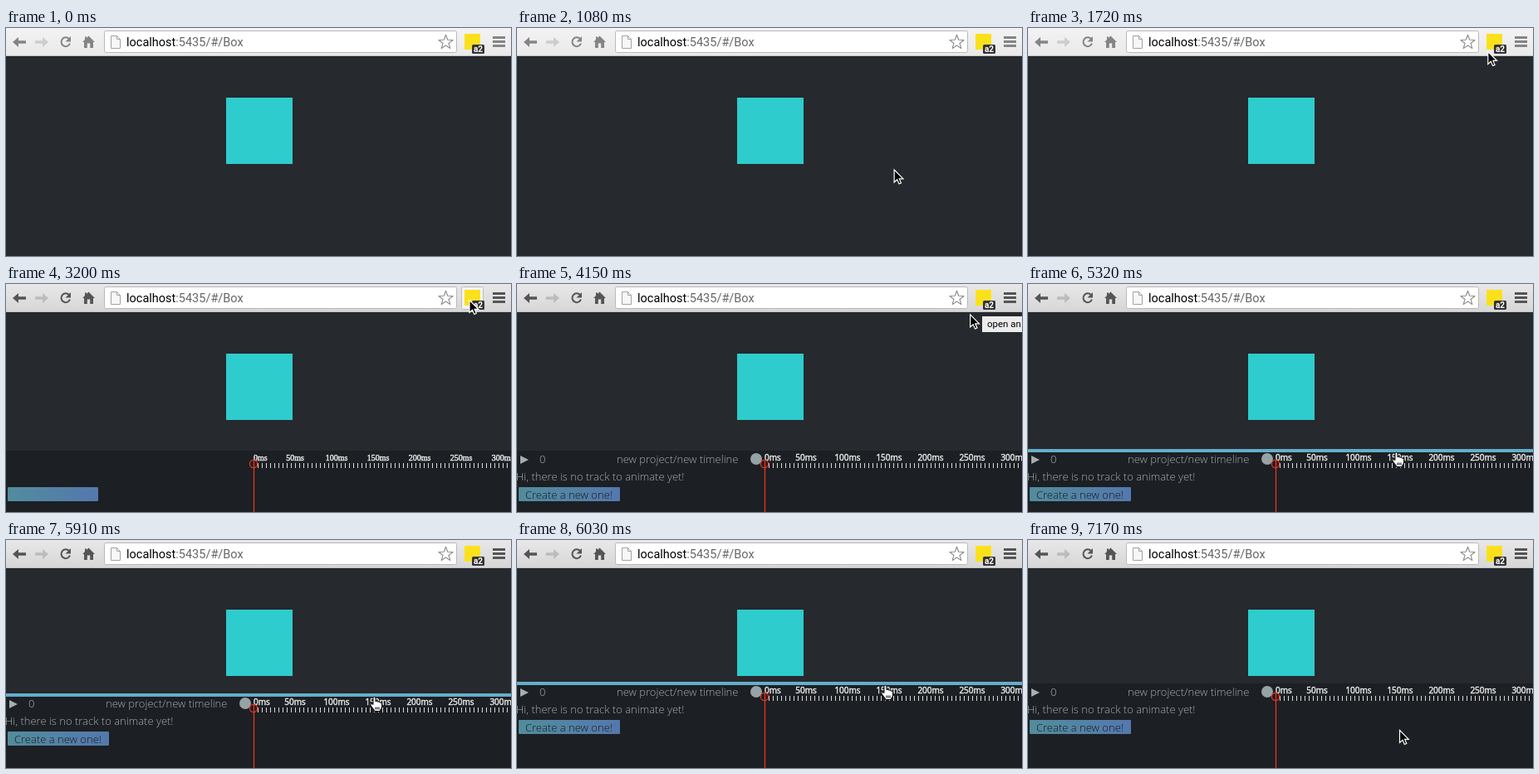
Write an HTML page that moves like this. It is 608 by 275 pixels and loops after 8000 ms.

```html
<!DOCTYPE html>
<html lang="en">
<head>
<meta charset="utf-8">
<title>Timeline panel</title>
<style>
html, body { margin: 0; width: 100%; height: 100%; overflow: hidden; background: #26292d; }
svg { display: block; width: 608px; height: 275px; }
text { white-space: pre; }
.ui { font-family: Roboto, sans-serif; }
.light { font: 300 13px "Open Sans", sans-serif; fill: #a3afb0; }
.ruler { font: 10px "Open Sans", sans-serif; fill: #e4e4e4; stroke: #e4e4e4; stroke-width: .5; }
.serif { font-family: "Liberation Serif", serif; }
#bar { --ink: #858585; --dim: #cdcdcd; }
#bar.active { --ink: #555; --dim: #bcbcbc; }
.ink { fill: var(--ink); }
.line { fill: none; stroke: var(--ink); }
</style>
</head>
<body>
<svg viewBox="0 0 608 275">
  <defs>
    <linearGradient id="idle" x2="0" y2="1"><stop stop-color="#f3f3f3"/><stop offset="1" stop-color="#e9e9e9"/></linearGradient>
    <linearGradient id="focus" x2="0" y2="1"><stop stop-color="#e9e8e9"/><stop offset="1" stop-color="#d7d6d7"/></linearGradient>
    <linearGradient id="blue"><stop stop-color="#528c9c"/><stop offset="1" stop-color="#5478ae"/></linearGradient>
    <path id="arrow" d="M0 6L7 0V4.2H16V7.8H7V12Z"/>
  </defs>

  <rect width="608" height="275" fill="#26292d"/>
  <rect x="265" y="84" width="80" height="80" fill="#2ecccd"/>

  <g id="panel">
    <rect y="201" width="608" height="110" fill="#1c1f23"/>
    <path id="ticks" fill="none" stroke="#d8d8d8"/>
    <g id="early">
      <rect x="2" y="245" width="109" height="17" rx="1" fill="url(#blue)"/>
      <g class="ruler serif"></g>
    </g>
    <g id="ready">
      <path d="M4 207L14 212L4 217Z" fill="#a3afb0"/>
      <circle cx="288" cy="211" r="7" fill="#95a3a6"/>
      <g class="light">
        <text x="27" y="216">0</text>
        <text x="120" y="216">new project/new timeline</text>
        <text x="-1" y="237">Hi, there is no track to animate yet!</text>
      </g>
      <rect x="2" y="245" width="122" height="17" rx="1" fill="url(#blue)"/>
      <text class="light" x="10" y="259" style="fill:#16191d">Create a new one!</text>
      <g class="ruler"></g>
    </g>
    <g fill="none" stroke="#e8351f" stroke-width="1.3">
      <circle cx="298" cy="217" r="4.6"/>
      <path d="M298.5 212V311"/>
    </g>
    <rect id="handle" y="199" width="608" height="4" fill="#64aecb"/>
  </g>

  <g id="bar">
    <rect id="chrome" width="608" height="34"/>
    <path d="M0 33.5H608" stroke="#c4c4c4"/>
    <use href="#arrow" x="8" y="11" class="ink"/>
    <use href="#arrow" transform="translate(51 11) scale(-1 1)" fill="var(--dim)"/>
    <path class="line" stroke-width="2" d="M76 13.2A5.4 5.4 0 1 0 77 18.6"/>
    <path class="ink" d="M78 10V16.5H71.5Z"/>
    <path class="ink" d="M99.5 9.5L107 17H105V24H101.2V18.6H97.8V24H94V17H92L95 14V10.5H97V12Z"/>
    <rect x="118.5" y="3.5" width="424" height="26" rx="2" fill="#fff" stroke="#b9b9b9"/>
    <path d="M126.5 9.5H133.5L137.5 13.5V24.5H126.5ZM133.5 9.5V13.5H137.5" fill="#f7f7f7" stroke="#a2a2a2"/>
    <text class="ui" x="145" y="22" font-size="14.5">localhost<tspan fill="#666">:5435/#/Box</tspan></text>
    <path id="star" fill="#fff" stroke="#8a8a8a" stroke-width="1.1" stroke-linejoin="round"/>
    <rect id="hover" x="548.5" y="3.5" width="26" height="27" rx="2" fill="#f4f4f4" stroke="#bdbdbd"/>
    <rect x="552" y="7" width="19" height="19" fill="#fbe11b"/>
    <rect x="561" y="20" width="15" height="11" rx="1.5" fill="#333"/>
    <text class="ui" x="568.5" y="29" font-size="10" font-weight="700" fill="#fff" text-anchor="middle">a2</text>
    <path class="line" stroke-width="3" d="M586 11.5H601M586 16.5H601M586 21.5H601"/>
  </g>

  <g id="tip">
    <rect x="560" y="39" width="60" height="19" fill="#ececec"/>
    <text class="ui" x="566" y="52" font-size="11.5">open an</text>
  </g>

  <g id="cursor">
    <path id="pointer" d="M0 0V15L3.5 11.8L5.8 17L8.3 16L6.1 10.9H10.8Z" fill="#000" stroke="#fff" stroke-width="1.2"/>
    <path id="hand" d="M-1 9V1.2Q-1 -.4 .4 -.4T1.9 1.2V5.2Q3.4 4 4.6 5.6Q6.2 4.8 7.2 6.6Q9.4 6 9.6 8.4V11.5Q9.4 14 7.8 15V17H.2V15.4L-3.8 10.4Q-4.4 8.2 -2.6 8ZM2 12V15M4 12V15M6 12V15" fill="#fff" stroke="#000" stroke-width="1"/>
  </g>
</svg>
<script>
const LOOP = 8000;
const $ = id => document.getElementById(id);
const show = (id, on) => $(id).style.display = on ? "" : "none";
const clamp = v => Math.max(0, Math.min(1, v));

// ruler
let ticks = "";
for (let x = 298.5; x < 608; x += 5) ticks += `M${x} 216V222`;
$("ticks").setAttribute("d", ticks);
for (const g of document.querySelectorAll("g.ruler"))
  for (let ms = 0; ms <= 300; ms += 50)
    g.innerHTML += `<text x="${298 + ms}" y="213" text-anchor="${ms ? "middle" : "start"}">${ms}ms</text>`;

// bookmark star
const star = [...Array(10)].map((_, i) => {
  const a = i * Math.PI / 5, r = i % 2 ? 3.7 : 9;
  return `${529.5 + r * Math.sin(a)} ${17.3 - r * Math.cos(a)}`;
});
$("star").setAttribute("d", `M${star.join("L")}Z`);

// cursor moves: start, end, steps, from, bend, to
const moves = [
  [500, 610, 3, [437, 228], [437, 205], [446, 188.5]],
  [910, 1670, 14, [446, 188.5], [478, 115], [553, 33]],
  [1720, 1950, 5, [556, 29.5], [544, 25], [557, 20.5]],
  [2130, 2130, 1, [557, 20.5], [558, 20], [558, 19.5]],
  [4030, 4680, 11, [558, 19.5], [486, 120], [443, 203.5]],
  [5850, 6030, 4, [443, 203.5], [443, 189.5], [443, 175.5]],
  [6990, 7170, 4, [443, 175.5], [444, 205], [447.5, 229.5]]
];

// share of a move done, in even steps, the first one at its start
const stepped = (t, a, b, n) =>
  t < a ? 0 : t >= b ? 1 : (Math.floor((t - a) / (b - a) * (n - 1)) + 1) / n;
const ease = k => k * k * (3 - 2 * k);

function cursorAt(t) {
  const [a, b, n, p, q, r] = moves.findLast(m => t >= m[0]) || moves[0];
  const k = ease(stepped(t, a, b, n));
  return p.map((v, i) => v * (1 - k) ** 2 + 2 * q[i] * k * (1 - k) + r[i] * k * k);
}

function draw(t) {
  const active = t >= 2550;
  $("bar").classList.toggle("active", active);
  $("chrome").setAttribute("fill", active ? "url(#focus)" : "url(#idle)");
  show("hover", active && t < 4150);

  show("panel", t >= 3200);
  show("early", t < 3310);
  show("ready", t >= 3310);
  const lift = -28 * ease(stepped(t, 5850, 6030, 4));
  $("panel").setAttribute("transform", `translate(0 ${lift})`);
  $("handle").style.opacity = stepped(t, 5080, 5140, 2) * (1 - stepped(t, 6990, 7110, 3));

  $("tip").style.opacity = t < 4030 ? 0 : clamp((4900 - t) / 500);

  const [x, y] = cursorAt(t), grab = t >= 5320 && t < 6990;
  show("cursor", t >= 500);
  show("hand", grab);
  show("pointer", !grab);
  $("cursor").setAttribute("transform", `translate(${x} ${y})`);
}

const begin = performance.now();
function frame() {
  draw((performance.now() - begin) % LOOP);
  requestAnimationFrame(frame);
}
frame();
</script>
</body>
</html>
```
